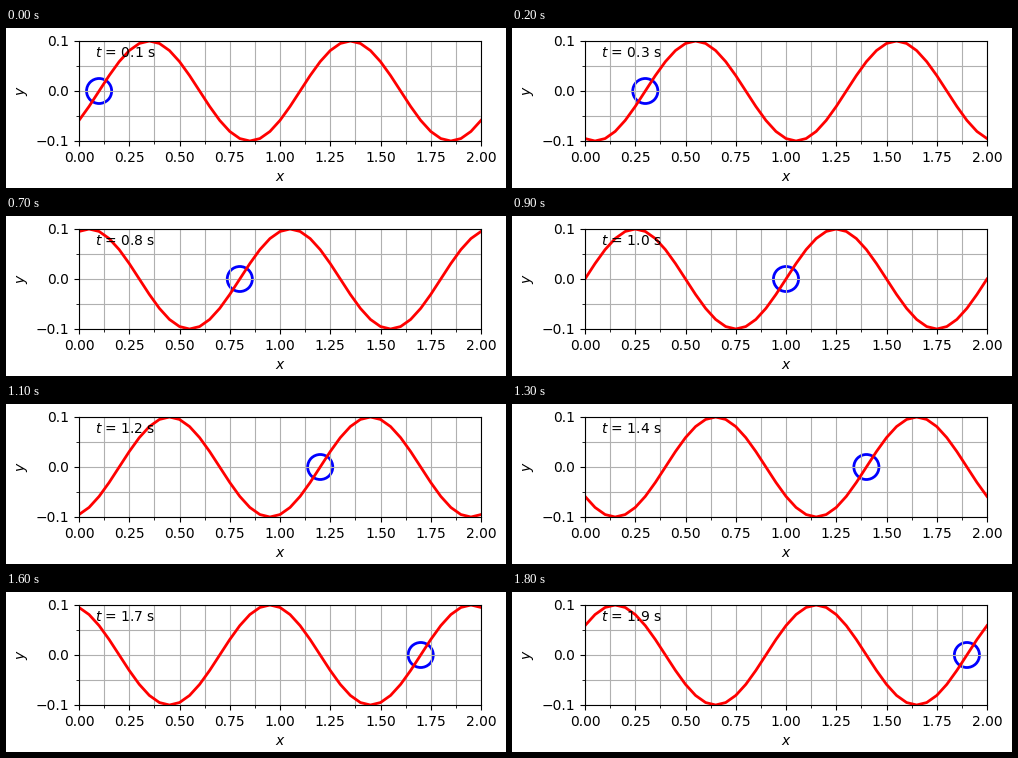
A matplotlib script for the animation above (1.9 s loop, 500 by 160 pixels).

```python
import numpy as np
import matplotlib.pyplot as plt
from matplotlib.animation import FuncAnimation
from matplotlib.patches import Ellipse
from matplotlib.ticker import AutoMinorLocator, MultipleLocator

WIDTH, HEIGHT, DPI = 500, 160, 100
LEFT, RIGHT, TOP, BOTTOM = 73, 475, 13, 113
FRAMES, INTERVAL = 19, 100
AMPLITUDE, WAVELENGTH, SPEED = 0.1, 1.0, 1.0

plt.rcParams["font.family"] = "DejaVu Sans"
plt.rcParams["font.size"] = 10

fig = plt.figure(figsize=(WIDTH / DPI, HEIGHT / DPI), dpi=DPI)
ax = fig.add_axes([LEFT / WIDTH, 1 - BOTTOM / HEIGHT,
                   (RIGHT - LEFT) / WIDTH, (BOTTOM - TOP) / HEIGHT])
ax.set_xlim(0, 2)
ax.set_ylim(-AMPLITUDE, AMPLITUDE)
ax.set_xlabel("$x$")
ax.set_ylabel("$y$")
for axis, step in ((ax.xaxis, 0.25), (ax.yaxis, 0.1)):
    axis.set_major_locator(MultipleLocator(step))
    axis.set_minor_locator(AutoMinorLocator(2))
ax.grid(True, which="both")

x = np.linspace(0, 2, 41)
wave, = ax.plot(x, np.zeros_like(x), color="red", lw=2)
# The ring lies below the grid lines and looks round on screen.
ring = Ellipse((0, 0), 0.125, 0.05, fill=False, ec="blue", lw=2)
ax.add_patch(ring)
clock = ax.text(0.08, 0.068, "")


def update(i):
    t = (i + 1) * INTERVAL / 1000
    wave.set_ydata(AMPLITUDE * np.sin(2 * np.pi * (x - SPEED * t) / WAVELENGTH))
    ring.set_center((SPEED * t, 0))
    clock.set_text(f"$t$ = {t:.1f} s")
    return wave, ring, clock


anim = FuncAnimation(fig, update, frames=FRAMES, interval=INTERVAL,
                     init_func=lambda: update(0), repeat=True, repeat_delay=0)
plt.show()
```
